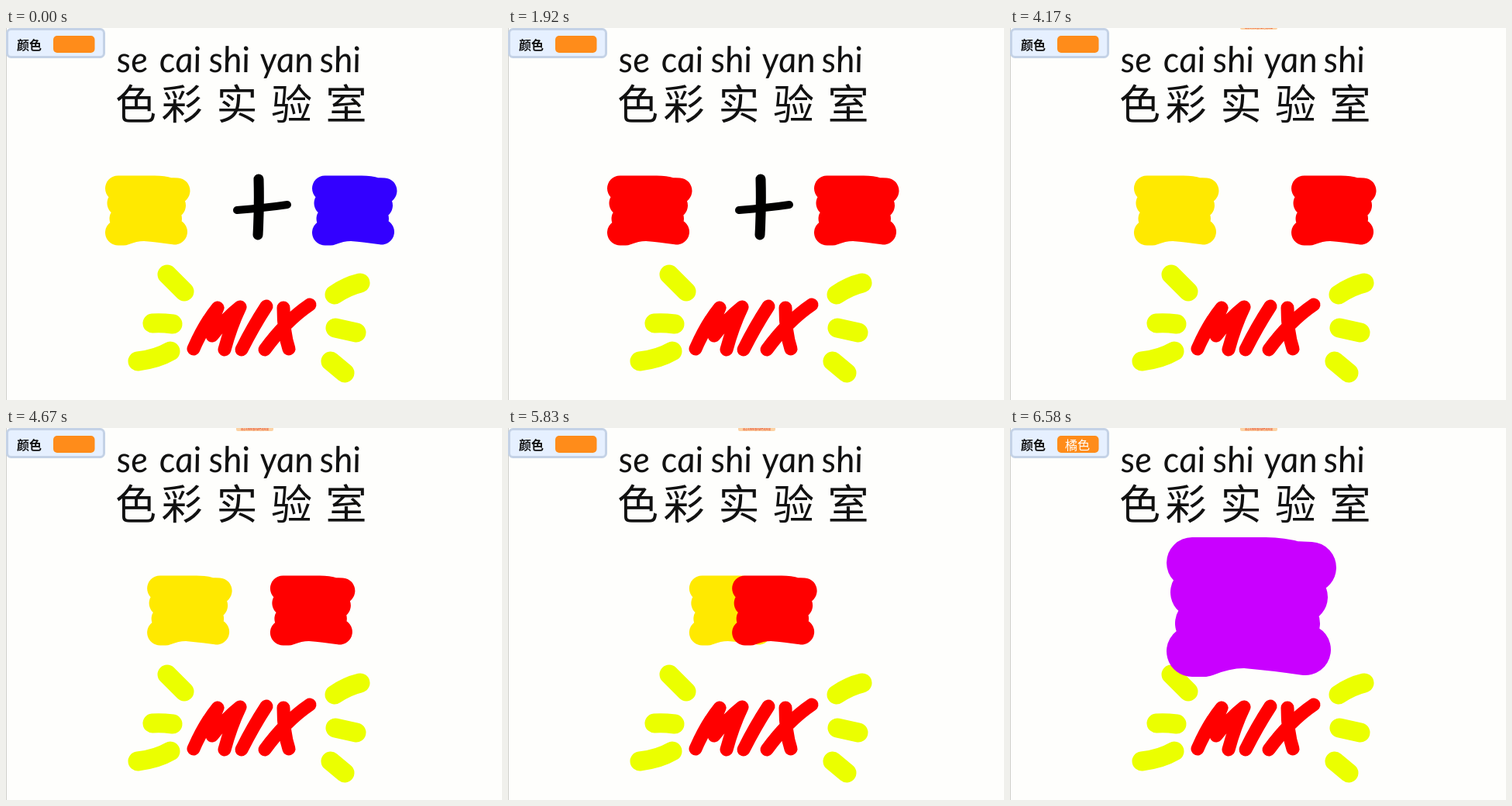
An HTML page that plays this animation: 640 by 480 pixels, repeating every 8 s.

```html
<!DOCTYPE html>
<html lang="zh-CN">
<head>
<meta charset="utf-8">
<title>色彩实验室</title>
<style>
  html, body { margin: 0; width: 100%; height: 100%; overflow: hidden; background: #fefefc; }
  svg { display: block; width: 640px; height: 480px; }
  text { font-family: "Noto Sans CJK SC", "Noto Sans CJK", sans-serif; }
  .stroke { fill: none; stroke-linecap: round; stroke-linejoin: round; }
  .pinyin { font: italic 46px Lato, sans-serif; }
  .hanzi { font-size: 53px; text-anchor: middle; }
</style>
</head>
<body>
<svg viewBox="0 0 640 480">
  <defs>
    <path id="blob" class="stroke" stroke-width="66"
      d="M-85-66H10Q30-66 46-61L68-60L-80-28L57-22L-74 12L47 12L-85 48H-70Q-40 36-15 37Q20 40 61 46"/>
  </defs>
  <rect width="640" height="480" fill="#fefefc"/>
  <path d="M.5 0V480" stroke="#d0d0cc"/>

  <g fill="#111">
    <text class="pinyin" transform="translate(0 57) skewX(6)"><tspan x="144">se</tspan><tspan x="199">cai</tspan><tspan x="263">shi</tspan><tspan x="329">yan</tspan><tspan x="406">shi</tspan></text>
    <text class="hanzi" y="117.5"><tspan x="167.5">色</tspan><tspan x="227">彩</tspan><tspan x="298">实</tspan><tspan x="368.5">验</tspan><tspan x="439">室</tspan></text>
  </g>

  <g class="stroke" stroke="#ebff00" stroke-width="25">
    <path d="M208 318L230 340M189 381Q200 380 215 382M170 430Q195 427 212 417"/>
    <path d="M424 344Q440 333 457 329M425 387L452 393M419 430L437 445"/>
  </g>
  <g class="stroke" stroke="#f00" stroke-width="17">
    <path d="M242 414Q256 382 273 361Q263 383 266 397Q284 374 302 360Q290 385 282 415"/>
    <path d="M336 359Q319 385 304 415M358 361Q358 393 365 414M392 357Q361 378 334 415"/>
  </g>

  <g id="plus" class="stroke" stroke="#000">
    <path d="M326 195Q327 230 325 267" stroke-width="13"/>
    <path d="M298 235Q335 232 363 228" stroke-width="10"/>
  </g>
  <use id="left" href="#blob"/>
  <use id="right" href="#blob"/>
  <use id="result" href="#blob" stroke="#c900ff" transform="translate(320 240)"/>

  <g id="banner">
    <rect x="297" y="-6" width="48" height="10" rx="2" fill="#fcd2a4"/>
    <text x="321" y="3" font-size="3" text-anchor="middle" fill="#e03018">请点击按钮混合颜色看结果</text>
  </g>

  <rect x="1.5" y="1.5" width="125" height="36" rx="5" fill="#e6f0ff" stroke="#c4d2e6" stroke-width="3"/>
  <text x="14" y="28" font-size="16" font-weight="700" fill="#111">颜色</text>
  <rect x="61" y="10" width="53.5" height="22" rx="5" fill="#ff8c1a"/>
  <text id="value" x="87" y="28" font-size="16" text-anchor="middle" fill="#fff">橘色</text>
</svg>
<script>
  const LOOP = 8000, FPS = 12;
  const YELLOW = '#ffe900', RED = '#f00', BLUE = '#3300ff';
  const MIX_STEP = 41, GLIDE_DELAY = 0.35, GLIDE_STEPS = 36, GLIDE_WIDTH = 133;
  const byId = id => document.getElementById(id);
  const clamp = (v, lo, hi) => Math.min(hi, Math.max(lo, v));
  const show = (id, on) => byId(id).setAttribute('visibility', on ? 'visible' : 'hidden');

  function placeBlob(id, x, color) {
    byId(id).setAttribute('transform', `translate(${x} 240) scale(.5)`);
    byId(id).setAttribute('stroke', color);
  }

  function leftColor(step) {
    if (step < 23 || step >= 29) return YELLOW;
    return step < 24 ? RED : BLUE;
  }

  function render(time) {
    const step = Math.floor((time + 5) * FPS / 1000);
    const glide = clamp((step - MIX_STEP - GLIDE_DELAY) / GLIDE_STEPS, 0, 1) * GLIDE_WIDTH;
    const mixed = step >= 78;
    placeBlob('left', 187 + glide, leftColor(step));
    placeBlob('right', 454 - glide, step < 23 ? BLUE : RED);
    show('left', !mixed);
    show('right', !mixed);
    show('result', mixed);
    show('plus', step < MIX_STEP);
    show('value', step >= 79);
    const drop = clamp(step - 48, 0, 4);
    byId('banner').setAttribute('transform', `translate(0 ${drop - 4})`);
    show('banner', drop > 0);
  }

  const start = performance.now();
  function tick() {
    render((performance.now() - start) % LOOP);
    requestAnimationFrame(tick);
  }
  tick();
</script>
</body>
</html>
```
